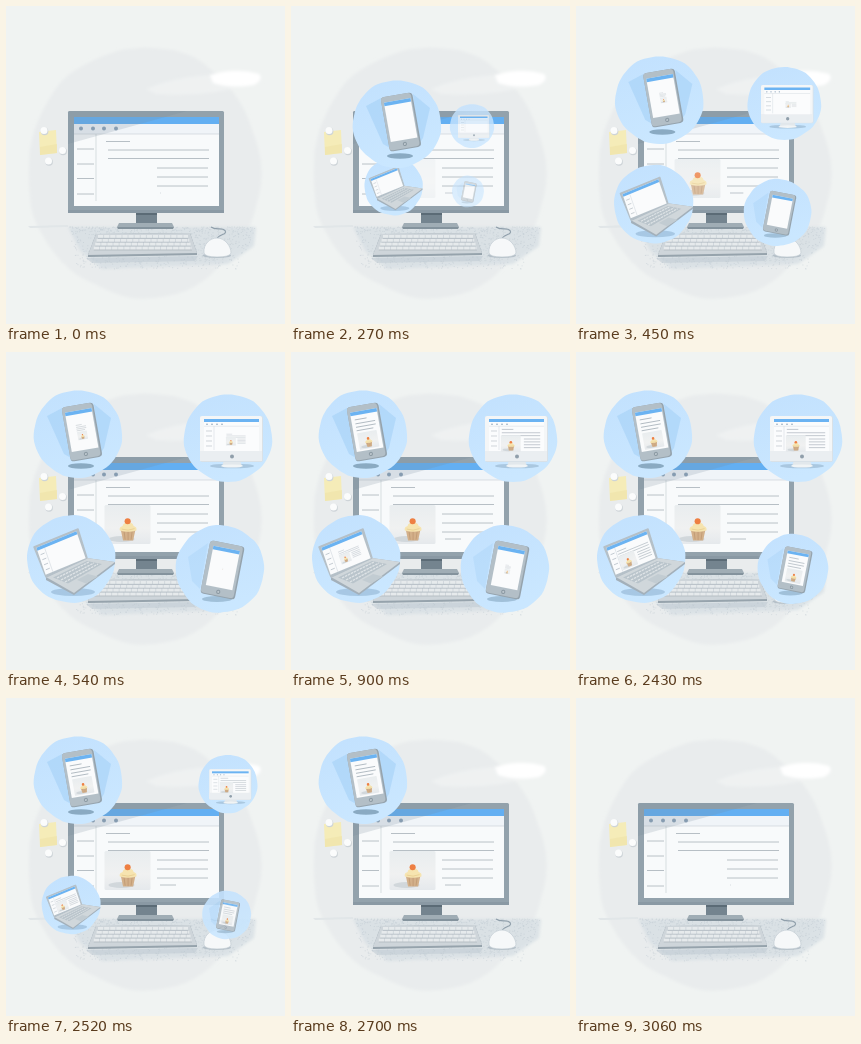
Animation of 279x318 px, one loop 3240 ms. Source, as an HTML page:

```html
<!DOCTYPE html>
<html lang="en">
<head>
<meta charset="utf-8">
<title>One message on every screen</title>
<style>
html, body { margin: 0; width: 100%; height: 100%; overflow: hidden; background: #f0f3f2; }
svg { display: block; width: 100vw; height: 100vh; }
</style>
</head>
<body>
<svg id="stage" viewBox="0 0 279 318"></svg>
<script>
const LOOP = 3240, STEP = 90;
const stage = document.getElementById('stage');

let seed = 11;
const rand = () => (seed = (seed * 16807) % 2147483647) / 2147483647;
const clamp = v => Math.max(0, Math.min(1, v));
const ramp = (t, from, to) => clamp((t - from) / (to - from));
const mix = (a, b, p) => a + (b - a) * p;

// Slightly uneven, brush-like disc
function blob(cx, cy, rx, ry, rough, phase) {
  let d = '';
  for (let i = 0; i < 72; i++) {
    const a = i / 72 * Math.PI * 2;
    const k = 1 + rough * (Math.sin(a * 5 + phase) + .6 * Math.sin(a * 11 + phase * 2) + .5 * (rand() - .5));
    d += (i ? 'L' : 'M') + (cx + rx * k * Math.cos(a)).toFixed(1) + ' ' + (cy + ry * k * Math.sin(a)).toFixed(1);
  }
  return d + 'Z';
}

const rect = (x, y, w, h, fill, more = '') =>
  `<rect x="${x}" y="${y}" width="${w}" height="${h}" fill="${fill}" ${more}/>`;
const poly = (points, fill, more = '') => `<polygon points="${points}" fill="${fill}" ${more}/>`;
const oval = (x, y, rx, ry, fill, more = '') =>
  `<ellipse cx="${x}" cy="${y}" rx="${rx}" ry="${ry}" fill="${fill}" ${more}/>`;
const rule = (x1, x2, y, color = '#b0b9c0', w = .9) =>
  `<path d="M${x1} ${y}H${x2}" stroke="${color}" stroke-width="${w}"/>`;
const rules = (x1, x2, ys, color, w) => ys.map(y => rule(x1, x2, y, color, w)).join('');

function speckles(n) {
  let d = '';
  for (let i = 0; i < n; i++) {
    const y = 221 + 42 * Math.pow(rand(), 1.6);
    const edge = (y - 221) * .45;
    const x = mix(62 + edge * .5, 250 - edge, rand());
    d += `M${x.toFixed(1)} ${y.toFixed(1)}h1`;
  }
  return `<path d="${d}" stroke="#b9c5cd" stroke-width=".8" opacity=".55"/>`;
}

function keyboard() {
  let keys = '';
  for (let r = 0; r < 4; r++) {
    const y = 230.5 + r * 3.9, left = 92 - r * 1.4, right = 182 + r * 1.3;
    keys += `<path d="M${left} ${y}H${right}" stroke="#e6eaec" stroke-width="3" stroke-dasharray="5.2 .9"/>`;
    keys += rule(left, right, y + 1.8, '#a4afb7', .6);
  }
  return poly('80,252 192,250 189,255 86,257', '#b5c1ca', 'opacity=".4"') +
    poly('90,228 184,227 191,247 191,249 82,251 82,249', '#96a3ac') +
    poly('90,228 184,227 191,247 82,249', '#ced5da') + keys;
}

// Photo with its top left corner at 0,0 and a size of 46 by 39
const photo = rect(0, 0, 46, 39, 'url(#photoBg)', 'rx="1.500"') +
  oval(17, 34, 13, 3, '#c2c9cf', 'opacity=".6"') +
  '<g transform="translate(.6 3.400) scale(.92)">' +
  poly('17,23 33,23 30.5,35 19.5,35', '#d3b08a') +
  '<path d="M20.5 24l1.3 10M25 24v10.500M29.500 24l-1.300 10" stroke="#bd9670" stroke-width=".8"/>' +
  '<path d="M16 24q-1-4 3-5q1-4 6-4t6 4q4 1 3 5q-9 3-18 0z" fill="#f6e4b0"/>' +
  '<path d="M18 22.500q7 2.500 14-.500" stroke="#ead093" fill="none"/>' +
  '<circle cx="24.500" cy="14" r="3.300" fill="#ee7f42"/></g>';

const photoAt = (x, y, s) => `<g transform="translate(${x} ${y}) scale(${s})">${photo}</g>`;

const pin = (x, y) => oval(x + .6, y + .9, 3.8, 3.8, '#ced4d8') + oval(x, y, 3.5, 3.5, '#fbfcfc');

const scene =
  `<path d="${blob(138, 166.5, 116.5, 125.5, .009, 1)}" fill="#e9eced" filter="url(#soft)"/>` +
  '<g filter="url(#soft)">' +
  '<path d="M140 83Q180 66 245 68L256 76Q200 92 150 88Z" fill="#f1f3f3" opacity=".8"/>' +
  '<path d="M204 69Q230 61 253 68Q258 73 248 79Q225 83 207 77Z" fill="#fff"/></g>' +
  poly('22,220 62,219 62,221 24,222', '#e1e6e8') +
  poly('62,221 250,221 248,240 222,258 96,263 74,245', '#d7dfe4', 'filter="url(#soft)" opacity=".8"') +
  speckles(900) +
  poly('33,126 50,124 51,147 34,149', '#f5ecb8') +
  poly('34,141 51,138 51,147 34,149', '#efe3a6', 'opacity=".6"') +
  pin(38, 124.5) + pin(56.5, 144.5) + pin(42.5, 155) +
  // Monitor
  rect(130, 205, 21, 13, '#74848f') + rect(130, 205, 21, 4, '#5b6b76') +
  poly('113,217 166,217 168,221 111,221', '#a0adb5') +
  poly('111,221 168,221 167,223 112,223', '#84939d') +
  rect(62, 105, 156, 102, '#93a2ac', 'rx="1.5"') +
  rect(62, 204, 156, 3, '#8a99a4') +
  rect(68, 111, 145, 89, '#f8fafb') +
  rect(68, 111, 145, 7, '#63aff2') +
  rect(68, 118, 145, 10, '#f0f4f8') +
  rule(68, 213, 128, '#cad1d7', .7) +
  [75, 87, 98, 110].map(x => oval(x, 122.5, 2, 2, '#8aa1b7')).join('') +
  '<path d="M90 128V195" stroke="#cad1d6" stroke-width=".7"/>' +
  rules(71, 88, [143, 158, 172.5, 188]) +
  rule(100, 124, 135.5) + rules(102, 203, [144, 152.5]) + rules(151, 202, [162, 171, 180]) +
  poly('62,105 181,105 62,138', '#738795', 'opacity=".2"') +
  // Mouse and keyboard
  keyboard() +
  '<path d="M211 233C212 228 222 229 219 224.5C216 221 210 225 205 221" fill="none" stroke="#8f9eaa" stroke-width="1.200"/>' +
  oval(211, 249.5, 14, 2.5, '#a5b2bc', 'opacity=".7"') +
  '<path d="M198 247C197 238 204 232 211 232C219 232 225 240 225 247Q224 251 211 251Q199 251 198 247Z" fill="#f6f8f9" stroke="#c2ccd3" stroke-width=".7"/>' +
  '<g id="typed" transform="translate(154 187)"><path d="M0 0H16" stroke="#b0b9c0" stroke-width=".9"/></g>' +
  `<g id="photo">${photoAt(98.5, 153, 1)}</g>`;

// Narrow message layout centred on 0,0
const INK = '#a7b1b9';
const note = rules(-10, 2, [-13], INK, .8) + rules(-10, 10, [-9, -5.5], INK, .8) +
  rules(-10, 7, [-2], INK, .8) + photoAt(-10, .5, .43);

// Wide message layout centred on 0,0
const letter = rules(-20, -8, [-10], INK, .7) + rules(-20, 20, [-6.5, -3.5], INK, .7) +
  rules(3, 20, [0, 3, 6, 9], INK, .7) + photoAt(-21, -4, .45);

const body = (id, content, place) => `<g transform="${place}"><g id="${id}Body">${content}</g></g>`;

const handheld = (id, tilt, w, h) =>
  `<g transform="rotate(${tilt})">` +
  rect(-w / 2, -h / 2, w, h, '#95a3ad', 'rx="3.5"') +
  rect(-w / 2, -h / 2, w - 1.5, h - 1, '#b3bfc7', 'rx="3.5"') +
  rect(-13.5, -22, 27, 40, '#fafbfc') + rect(-13.5, -22, 27, 3.5, '#6bb3f2') +
  oval(0, 22.3, 2.1, 2.1, '#8a98a2') + oval(0, 22.3, 1.1, 1.1, '#bcc6cd') +
  body(id, note, 'translate(0 -1)') + '</g>';

const devices = {
  tr: oval(4, 28, 22, 2.3, '#9dbbd3', 'opacity=".7"') +
    poly('-3,20 11,20 14,28 -6,28', '#e2e8ec') + oval(4, 28, 11, 1.6, '#f1f4f5') +
    rect(-28, -22, 63, 46, '#d9e1e7', 'rx="2"') + rect(-28, -22, 62, 45, '#f4f6f7', 'rx="2"') +
    rect(-28, 13, 62, 10, '#eaeef1') + oval(4, 18.5, 2, 2, '#909fab') +
    rect(-24, -19, 55, 32, '#fbfcfd') + rect(-24, -19, 55, 3, '#6bb3f2') +
    [-21, -16, -11, -6].map(x => oval(x, -13.8, .8, .8, '#8aa1b7')).join('') +
    rule(-24, 31, -11.8, '#cfd6dc', .5) +
    '<path d="M-14-12V12" stroke="#cfd6dc" stroke-width=".5"/>' +
    rules(-22, -16, [-7, -2, 3, 8], '#bcc4cb', .7) + body('tr', letter, 'translate(8 1) scale(.96)'),
  bl: oval(2, 33, 22, 4, '#86aac9', 'opacity=".5"') +
    poly('-25,18 16,-1 44,3 44,5 3,36 -25,21', '#a3b0ba') +
    poly('-25,18 16,-1 44,3 3,34', '#d0d7db') +
    poly('-18,18.5 16,2 31,5 -3,24.5', '#b9c4cb') +
    '<path d="M-14 19L18 3M-10 21L23 4M-6 23L27 5" stroke="#dfe4e7" stroke-width="1.300" stroke-dasharray="2.500 .8"/>' +
    poly('6,21 17,15 27,17.5 15,24.5', '#c2ccd2') +
    '<path d="M-37-12L7-30L16-1L-25 18Z" fill="#b5c0c8" stroke="#b5c0c8" stroke-width="1.500" stroke-linejoin="round"/>' +
    // Screen plane slanted along the lid
    '<g transform="matrix(.8 -.33 .29 .84 -10 -6)">' +
    rect(-25, -16, 50, 32, '#fafbfc') + rect(-25, -16, 50, 3.5, '#6bb3f2') +
    '<path d="M-16-12V16" stroke="#cfd6dc" stroke-width=".6"/>' +
    rules(-23, -18, [-7, -1, 5, 11], '#b4bdc5', .8) + body('bl', letter, 'translate(4 2) scale(.93)') + '</g>',
  br: poly('-32,-12 -12,-26 -20,20 -28,12', '#a8d3f8', 'opacity=".4"') +
    oval(-3, 30, 15, 3, '#86a6c0', 'opacity=".6"') +
    `<g transform="translate(2.5 1)">${handheld('br', 11, 35, 54)}</g>`,
  tl: poly('-31,-18 -16,-26 -7,24 -14,20', '#a8d3f8', 'opacity=".65"') +
    poly('16,-30 33,-16 26,14 22,20', '#a8d3f8', 'opacity=".65"') +
    oval(3, 32, 13, 2.8, '#7495ae', 'opacity=".75"') +
    `<g transform="translate(4 -2)">${handheld('tl', -10, 32, 55)}</g>`
};

const bubble = (id, art, i) => `<g id="${id}">` +
  `<path d="${blob(0, 0, 44.2, 43.8, .008, i * 2)}" fill="url(#sky)"/>` + art + '</g>';

stage.innerHTML = `<defs>
  <linearGradient id="sky" x2=".35" y2="1"><stop stop-color="#c2e1fe"/><stop offset="1" stop-color="#cae7ff"/></linearGradient>
  <linearGradient id="photoBg" x2="0" y2="1"><stop stop-color="#e9edef"/><stop offset=".6" stop-color="#f0f1f1"/><stop offset="1" stop-color="#e5e9ec"/></linearGradient>
  <filter id="soft" x="-10%" y="-20%" width="120%" height="140%"><feGaussianBlur stdDeviation="1.500"/></filter>
</defs>` + rect(0, 0, 279, 318, '#f0f3f2') + scene +
  Object.entries(devices).map(([id, art], i) => bubble(id, art, i)).join('');

const $ = id => document.getElementById(id);
const origin = { x: 140, y: 154 };
// grow: size along the flight; fill: message growth; leave: shrinking
const bubbles = [
  { id: 'tl', x: 72, y: 82, grow: p => Math.min(1, 2 * p), fill: [270, 810], leave: [2790, 3060], bend: 1, drift: 0 },
  { id: 'tr', x: 222, y: 86, grow: p => p, fill: [270, 810], leave: [2430, 2700], bend: 1, drift: 0 },
  { id: 'bl', x: 65, y: 207, grow: p => Math.pow(p, .6), fill: [540, 1080], leave: [2430, 2700], bend: 1, drift: 0 },
  { id: 'br', x: 214, y: 217, grow: p => Math.pow(p, 1.47), fill: [720, 1350], leave: [2340, 2700], bend: 1.16, drift: 15 }
];

function show(el, scale, x, y) {
  el.setAttribute('transform', `translate(${x} ${y}) scale(${scale})`);
  el.setAttribute('opacity', Math.min(1, scale * 1.6));
  el.setAttribute('visibility', scale > .001 ? 'visible' : 'hidden');
}

function draw(t) {
  const flight = ramp(t, 0, 540);
  for (const b of bubbles) {
    const rest = 1 - Math.pow(ramp(t, ...b.leave), b.bend);
    const x = mix(origin.x, b.x, flight) + b.drift * (1 - rest);
    show($(b.id), b.grow(flight) * rest, x, mix(origin.y, b.y, flight));
    const dot = b.id === 'br' && t >= 540 ? .05 : 0;
    const fill = Math.max(dot, ramp(t, ...b.fill));
    const part = $(b.id + 'Body');
    part.setAttribute('transform', `scale(${fill})`);
    part.style.display = fill > 0 ? '' : 'none';
  }
  const back = 1 - ramp(t, 2790, 3060);
  $('photo').setAttribute('opacity', ramp(t, 90, 540) * back);
  $('typed').setAttribute('transform', `translate(154 187) scale(${Math.max(.06, ramp(t, 0, 540) * back)} 1)`);
}

function tick() {
  draw(Math.floor(performance.now() % LOOP / STEP) * STEP);
  requestAnimationFrame(tick);
}
tick();
</script>
</body>
</html>
```
